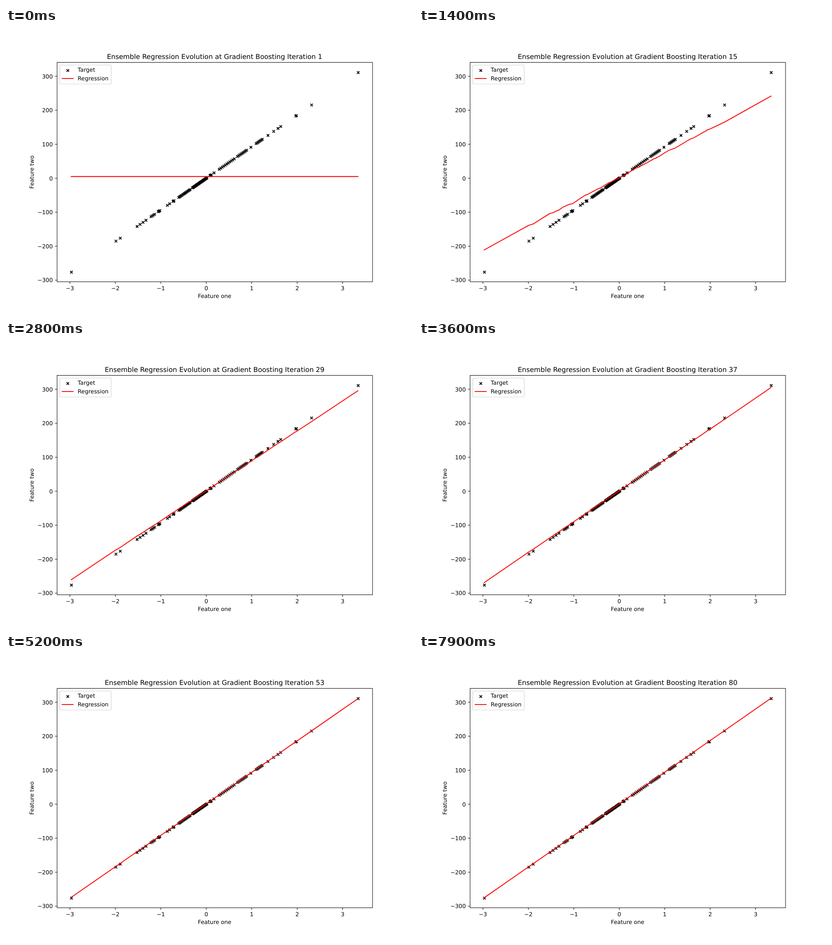
Recreate the animation shown at these times as an HTML page. Size 894x626 px, loop 8 s.

```html
<!DOCTYPE html>
<html lang="en">
<head>
<meta charset="utf-8">
<title>Gradient boosting</title>
<style>
  html, body { margin: 0; width: 100%; height: 100%; overflow: hidden; background: #fff; }
  svg { display: block; }
  text { font: 12.33px "DejaVu Sans", sans-serif; text-rendering: geometricPrecision; }
  #title { font-size: 14.85px; }
  .mid { text-anchor: middle; }
  .end { text-anchor: end; }
  .axis { fill: none; stroke: #000; stroke-width: 1; }
  .cross { fill: none; stroke: #000; stroke-width: 1.86; }
  .fit { fill: none; stroke: #f00; stroke-width: 1.86; stroke-linejoin: round; stroke-linecap: square; }
</style>
</head>
<body>
<svg width="894" height="626" viewBox="0 0 894 626">
  <path id="ticks" class="axis"/>
  <g id="labels"></g>
  <path id="points" class="cross"/>
  <path id="line" class="fit"/>
  <rect class="axis" x="112.2" y="75.5" width="692.9" height="481.9"/>
  <text id="title" class="mid" x="458.2" y="67.7"></text>
  <text class="mid" x="458.2" y="593">Feature one</text>
  <text class="mid" transform="translate(61.2 316.5) rotate(-90)">Feature two</text>
  <rect x="118.2" y="81.5" width="112.9" height="41.5" rx="2.5" fill="#fff" fill-opacity=".8" stroke="#ccc" stroke-opacity=".8" stroke-width="1.2"/>
  <path id="key" class="cross"/>
  <path class="fit" d="M123.2 110.9H147.6"/>
  <text x="157.6" y="96.2">Target</text>
  <text x="157.6" y="114.8">Regression</text>
</svg>
<script>
const STEPS = 80, STEP_MS = 100, RATE = 0.1, DEPTH = 4, START = 326.2;
const $ = id => document.getElementById(id);

// Samples on a straight line: lone ones, and evenly spaced runs [from, to, count].
const lone = [143.2, 241, 250.5, 456.5, 537.5, 575, 587.5, 597, 603, 636, 637.5, 670.8, 773.1];
const runs = [
  [287.5, 307, 4], [318, 326, 4], [334, 337.5, 3], [354, 359, 2], [366.5, 368.5, 3], [379, 404, 13],
  [409, 441, 24], [447.5, 450.5, 3], [468, 501, 11], [508, 528, 9], [549, 562.5, 7]
];
const spread = ([from, to, n]) => Array.from({ length: n }, (_, i) => from + (to - from) * i / (n - 1));
const xs = [...lone, ...runs.flatMap(spread)].sort((a, b) => a - b);
const ys = xs.map(x => 97.2 + (773.1 - x) * 0.6957);

const cross = (x, y) => `M${x - 2.75} ${y - 2.75}l5.5 5.5m0 -5.5l-5.5 5.5`;
const sum = list => list.reduce((a, b) => a + b, 0);

// Adds one regression tree, fitted to the residuals of samples lo..hi, to pred.
function grow(res, pred, lo, hi, depth) {
  const total = sum(res.slice(lo, hi)), n = hi - lo;
  if (!depth || n < 2) {
    for (let i = lo; i < hi; i++) pred[i] += RATE * total / n;
    return;
  }
  let best = -1, cut = lo + 1, left = 0;
  for (let k = lo + 1; k < hi; k++) {
    left += res[k - 1];
    const score = left ** 2 / (k - lo) + (total - left) ** 2 / (hi - k);
    if (score > best) { best = score; cut = k; }
  }
  grow(res, pred, lo, cut, depth - 1);
  grow(res, pred, cut, hi, depth - 1);
}

const pred = xs.map(() => START);
const lines = Array.from({ length: STEPS }, () => {
  const d = "M" + xs.map((x, i) => `${x} ${pred[i].toFixed(2)}`).join("L");
  grow(ys.map((y, i) => y - pred[i]), pred, 0, xs.length, DEPTH);
  return d;
});

function label(x, y, value, align) {
  const text = String(value).replace("-", "\u2212");
  $("labels").innerHTML += `<text class="${align}" x="${x}" y="${y}">${text}</text>`;
}

let ticks = "";
for (let v = -3; v <= 3; v++) {
  const x = 439.9 + 99.85 * v, y = 330 - 74.65 * v;
  ticks += `M${x} 557.4v4.6M112.2 ${y}h-4.6`;
  label(x, 575.9, v, "mid");
  label(102.8, y + 4.5, v * 100, "end");
}
$("ticks").setAttribute("d", ticks);
$("points").setAttribute("d", xs.map((x, i) => cross(x + 0.5, ys[i] + 0.8)).join(""));
$("key").setAttribute("d", cross(135.7, 93.4));

let shown = -1;
function draw(now) {
  const step = Math.floor(now / STEP_MS) % STEPS;
  if (step !== shown) {
    shown = step;
    $("line").setAttribute("d", lines[step]);
    $("title").textContent = `Ensemble Regression Evolution at Gradient Boosting Iteration ${step + 1}`;
  }
  requestAnimationFrame(() => draw(performance.now()));
}
draw(0);
</script>
</body>
</html>
```
